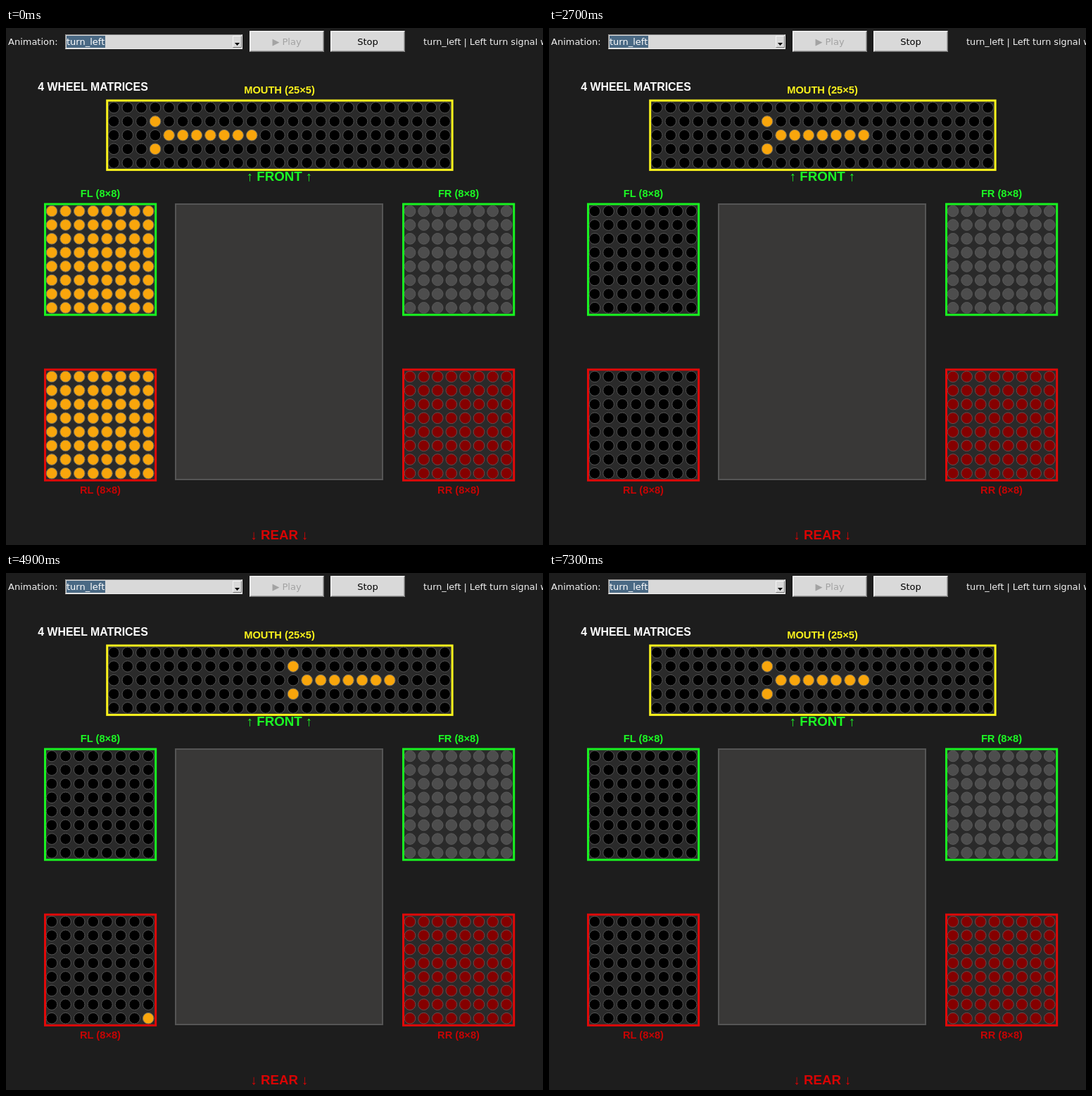
Recreate the animation shown at these times as an HTML page. Size 763 by 734 pixels, loop 7500 ms.

```html
<!DOCTYPE html>
<html lang="en">
<head>
<meta charset="utf-8">
<title>LED matrix preview</title>
<style>
html, body { margin: 0; width: 100%; height: 100%; overflow: hidden; background: #1d1d1d; }
svg { display: block; }
.ui { font: 13px "DejaVu Sans", sans-serif; }
.tag { font: bold 14.67px "Liberation Sans", Arial, sans-serif; text-anchor: middle; }
.big { font-size: 18.67px; }
</style>
</head>
<body>
<svg id="stage" width="763" height="734" viewBox="0 0 763 734" xmlns="http://www.w3.org/2000/svg"></svg>
<script>
const LOOP = 7500, TICK = 100, REPAINT = 80, PITCH = 19.6;
const AMBER = "#f9a60c", OFF = "#000";
const GREEN = "#18f320", RED = "#e20808", YELLOW = "#fbf31c";
const stage = document.getElementById("stage");

function add(tag, attrs, text) {
  const el = document.createElementNS("http://www.w3.org/2000/svg", tag);
  for (const key in attrs) el.setAttribute(key, attrs[key]);
  if (text) el.textContent = text;
  stage.appendChild(el);
  return el;
}
const rect = (x, y, width, height, fill, more) => add("rect", { x, y, width, height, fill, ...more });
const path = (d, stroke) => add("path", { d, stroke, fill: "none" });
const label = (x, y, fill, text, cls = "tag", more) => add("text", { x, y, fill, class: cls, ...more }, text);

function bevel(x, y, w, h, light, dark) {
  path(`M${x + .5} ${y + h - .5}V${y + .5}H${x + w - .5}`, light);
  path(`M${x + .5} ${y + h - .5}H${x + w - .5}V${y + .5}`, dark);
}
function button(x, text, color) {
  rect(x, 4, 106, 30, "#d9d9d9");
  bevel(x, 4, 106, 30, "#f4f4f4", "#6c6c6c");
  bevel(x + 1, 5, 104, 28, "#e6e6e6", "#a8a8a8");
  label(x + 53, 23.5, color, text, "ui", { "text-anchor": "middle" });
}
// A framed grid of LEDs; returns the circles row by row.
function matrix(x, y, cols, rows, frame, fill, ring) {
  rect(x - 9.5, y - 10, cols * PITCH + .4, rows * PITCH + .4, "#2a2a2a",
    { stroke: frame, "stroke-width": 3 });
  const leds = [];
  for (let i = 0; i < cols * rows; i++) {
    leds.push(add("circle", {
      cx: x + i % cols * PITCH, cy: y + Math.floor(i / cols) * PITCH,
      r: 7.8, fill, stroke: ring
    }));
  }
  return leds;
}

rect(0, 0, 763, 734, "#1d1d1d");

// Toolbar
label(3, 23.5, "#f0f0f0", "Animation:", "ui");
rect(84, 9, 252, 21, "#d9d9d9");
bevel(84, 9, 252, 21, "#828282", "#efefef");
rect(86, 11, 55, 17, "#4a6984");
label(86, 23.5, "#fff", "turn_left", "ui");
rect(322, 11, 13, 17, "#d9d9d9");
bevel(322, 11, 13, 17, "#f4f4f4", "#777");
add("path", { d: "M325 21h7l-3.5 4z", fill: "#000" });
button(346, "▶ Play", "#a3a3a3");
button(461, "Stop", "#000");
label(593, 23.5, "#f0f0f0", "turn_left | Left turn signal with arrow", "ui", { style: "font-size:12.8px" });

// Vehicle layout
rect(241, 250, 294, 391, "#393837", { stroke: "#555", "stroke-width": 2 });
const fl = matrix(65, 260, 8, 8, GREEN, AMBER, "#6a6558");
matrix(574, 260, 8, 8, GREEN, "#4d4d4d", "#585858");
const rl = matrix(65, 495, 8, 8, RED, AMBER, "#6a6558");
matrix(574, 495, 8, 8, RED, "#850000", "#6a4a4a");
const mouth = matrix(153.2, 113, 25, 5, YELLOW, OFF, "#545454");

label(123.5, 89, "#fff", "4 WHEEL MATRICES", "tag", { style: "font-size:15.9px" });
label(388.5, 93, YELLOW, "MOUTH (25×5)");
label(388.5, 217, "#1cfb24", "↑ FRONT ↑", "tag big");
label(134, 240, "#1cfb24", "FL (8×8)");
label(643, 240, "#1cfb24", "FR (8×8)");
label(134, 661, "#c60404", "RL (8×8)");
label(643, 661, "#c60404", "RR (8×8)");
label(388.5, 726, "#d80404", "↓ REAR ↓", "tag big");

// Arrow head column and lamp state for each step of the signal
const poses = [{ head: 13, on: true }, { head: 8, on: false }, { head: 3, on: true }];
// Moments (ms) at which a repaint begins
const starts = [60, 310, 510, 810, 1060, 1310, 1560, 1810, 2060, 2360, 2610, 2810, 3060, 3396.4,
  3610, 3860, 4110, 4360, 4610, 4860, 5110, 5360, 5610, 5860, 6160, 6410, 6660, 6910, 7160];
const TOTAL = 4 * 64 + 125;

function inArrow(i, head) {
  const col = i % 25 - head, row = Math.floor(i / 25);
  return row === 2 ? col > 0 && col < 8 : col === 0 && (row === 1 || row === 3);
}
function paint(leds, first, now, old, done, lit) {
  leds.forEach((led, i) => {
    const on = lit(i, first + i < done ? now : old);
    led.setAttribute("fill", on ? AMBER : OFF);
    led.setAttribute("stroke", on ? "#77705c" : "#545454");
  });
}
function draw(ms) {
  const t = Math.floor(ms % LOOP / TICK) * TICK;
  const k = starts.filter(s => s <= t).length - 1;
  const done = k < 0 ? TOTAL : (t - starts[k]) / REPAINT * TOTAL;
  const now = poses[(k + 3) % 3], old = poses[(k + 2 + 3) % 3];
  const lamp = (i, pose) => pose.on;
  paint(fl, 0, now, old, done, lamp);
  paint(rl, 128, now, old, done, lamp);
  paint(mouth, 256, now, old, done, (i, pose) => inArrow(i, pose.head));
}

const begin = performance.now();
function loop() {
  draw(performance.now() - begin);
  requestAnimationFrame(loop);
}
draw(0);
requestAnimationFrame(loop);
</script>
</body>
</html>
```
